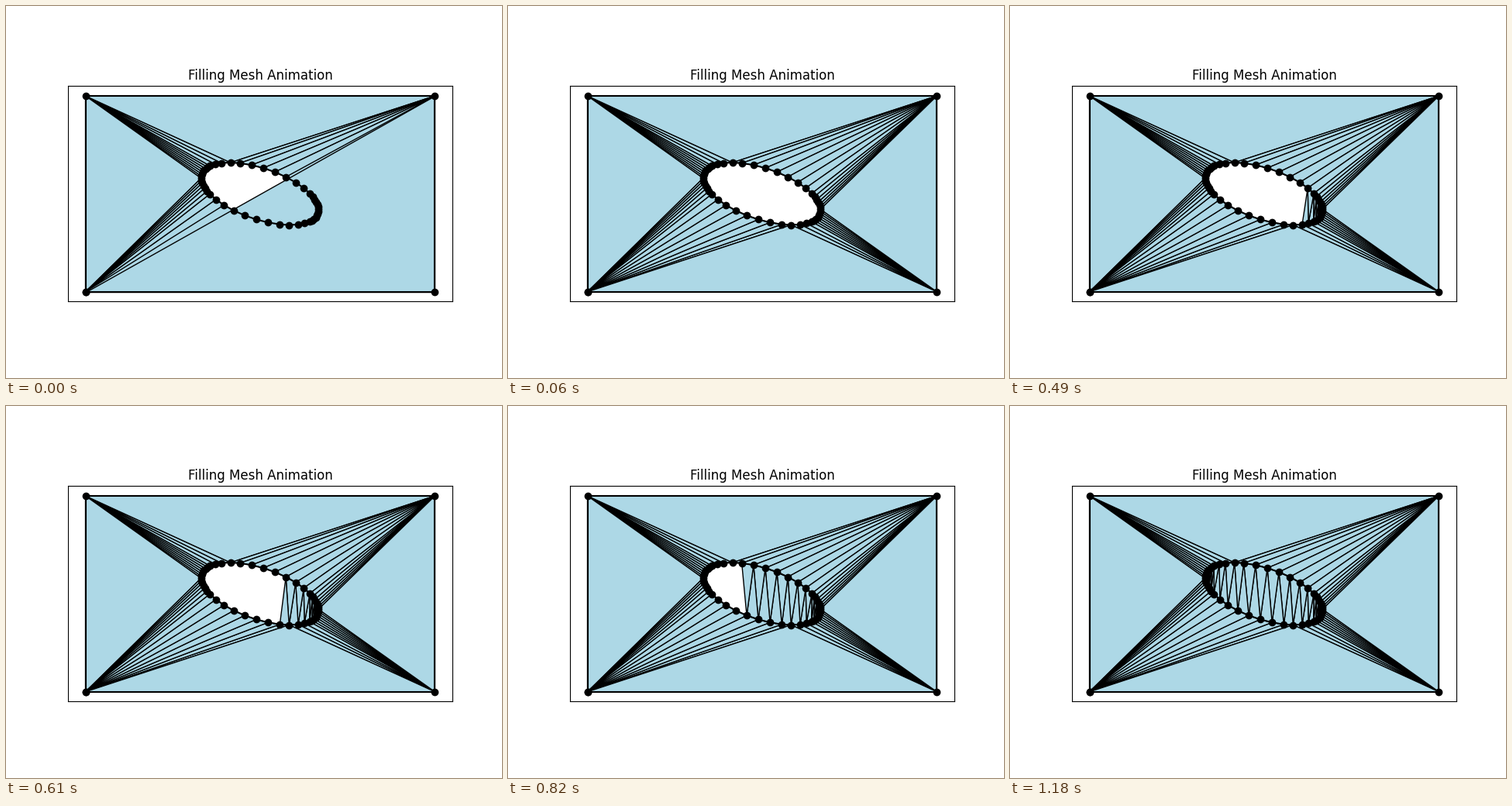
Recreate the animation shown at these times as a matplotlib script. Size 640 by 480 pixels, loop 1.47 s.

```python
import numpy as np
import matplotlib.pyplot as plt
from matplotlib.animation import FuncAnimation
from matplotlib.collections import PolyCollection

LOOP_MS, TICK_MS = 1470, 10
STRIP_START, STRIP_STEP = 70, 30
W, H = 16, 8.97
BL, BR, TR, TL = corners = np.array([(0, 0), (W, 0), (W, H), (0, H)])


def ellipse_points():
    """Hole outline, clockwise from the upper left, denser at the two tips."""
    side = [-1.149, -1.003, -.852, -.662, -.488, -.281, -.08,
            .12, .32, .517, .705, .88, .976, 1.074]
    tip = np.linspace(side[-1], side[0] + np.pi, 12)[1:-1]
    half = np.concatenate([side, tip])
    t = np.concatenate([half, half + np.pi])
    u, v = 2.81 * np.sin(t), 1.17 * np.cos(t)
    c, s = np.cos(np.radians(18.7)), np.sin(np.radians(18.7))
    x0, y0 = W / 2 - 0.018, H / 2 + 0.005
    return np.column_stack([x0 + u * c + v * s, y0 - u * s + v * c])


hole = ellipse_points()
n = len(hole)
TOP, RIGHT, TIP = 3, 17, 18
BOTTOM, LEFT = TOP + n // 2, RIGHT + n // 2


def fan(corner, first, last):
    return [(corner, hole[i % n], hole[(i + 1) % n]) for i in range(first, last)]


def outer_mesh(stage):
    tris = fan(TL, LEFT, TOP + n) + [(TL, TR, hole[TOP]), (TL, BL, hole[LEFT])]
    if stage == 0:
        # everything below the diagonal is still one triangle
        tris += fan(TR, TOP, 8) + fan(BL, 9 + n // 2, LEFT)
        return tris + [(BL, BR, TR)]
    tris += fan(TR, TOP, RIGHT) + fan(BL, BOTTOM, LEFT)
    if stage == 2:
        tris += fan(BR, RIGHT, BOTTOM)
        tris += [(TR, BR, hole[RIGHT]), (BL, BR, hole[BOTTOM])]
    return tris


# Zigzag strip from the right tip of the hole to the left one
zigzag = [(TIP + (k + 1) // 2 * (-1) ** k) % n for k in range(n)]
strip = [hole[zigzag[k:k + 3]] for k in range(n - 2)]
stages = [outer_mesh(s) for s in range(3)]

fig, ax = plt.subplots(figsize=(6.4, 4.8), dpi=100)
ax.set_aspect("equal")
ax.set_xticks([])
ax.set_yticks([])
ax.set_title("Filling Mesh Animation")
ax.fill(*corners.T, color="lightblue", lw=0, zorder=0.5)
ax.fill(*hole.T, color="white", lw=0, zorder=0.6)
mesh = PolyCollection([], facecolor="lightblue", edgecolor="black",
                      linewidth=1, zorder=1)
ax.add_collection(mesh)
for ring in (corners, hole):
    ax.plot(*np.vstack([ring, ring[:1]]).T, "ko-")
ax.set_xlim(-0.05 * W, 1.05 * W)
ax.set_ylim(-0.05 * H, 1.05 * H)


def update(frame):
    ms = frame * TICK_MS
    filled = max(0, (ms - STRIP_START) // STRIP_STEP + 1)
    mesh.set_verts(stages[min(ms // 30, 2)] + strip[:filled])
    return [mesh]


anim = FuncAnimation(fig, update, frames=LOOP_MS // TICK_MS,
                     interval=TICK_MS, repeat=True, repeat_delay=0)
plt.show()
```
